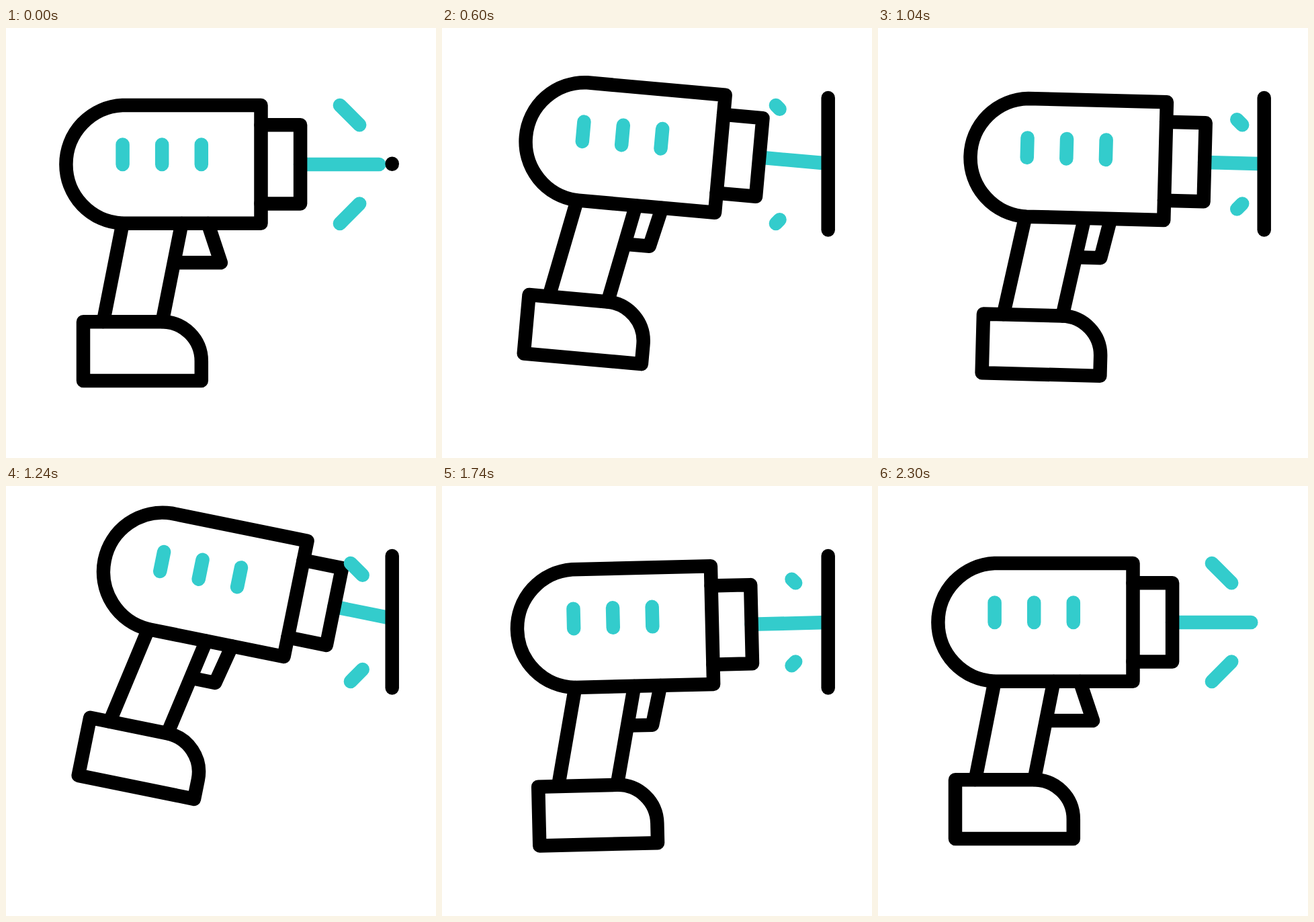
These frames come from a looping animation (640 px wide and 640 px high, 2.4 s). An HTML page:

```html
<!DOCTYPE html>
<html lang="en">
<head>
<meta charset="utf-8">
<title>Drill</title>
<style>
  html, body { margin: 0; width: 100%; height: 100%; overflow: hidden; background: #fff; }
  svg { display: block; width: 100vw; height: 100vh; }
  path { fill: none; stroke: #000; stroke-width: 20.5; stroke-linecap: round; stroke-linejoin: round; }
  .hot { stroke: #33cccc; }
</style>
</head>
<body>
<svg viewBox="0 0 640 640">
  <defs>
    <clipPath id="front"><rect x="-100" y="-100" width="674" height="900"/></clipPath>
  </defs>
  <g clip-path="url(#front)">
    <g id="drill">
      <path class="hot" d="M438 203H555.3"/>
      <path d="M379.5 144.3H438.1V261.5H379.5"/>
      <path id="trigger"/>
      <path d="M173.6 291L144.8 437M261.5 291L232.5 437"/>
      <path d="M379.5 115H173.2A88 88 0 0 0 173.2 290.8H379.5Z"/>
      <path d="M115 437.2H232.2A58.6 58.6 0 0 1 290.8 495.8V525H115Z"/>
      <path class="hot" d="M173.6 173.5V203M232.2 173.5V203M290.8 173.5V203"/>
    </g>
  </g>
  <path id="wall"/>
  <path id="sparks" class="hot"/>
</svg>
<script>
const LOOP = 2400;
const get = id => document.getElementById(id);
const drill = get('drill'), trigger = get('trigger'), wall = get('wall'), sparks = get('sparks');

// Each track is a list of [time, value].
const TILT = [[100, 0], [465, 11.3], [836, -6.85], [1340, 14.7], [1842, -4.3], [2180, 0]];
const PUSH = [[180, 0], [780, 48], [1242, 48], [2180, 0]];
const SQUEEZE = [[0, 0], [200, 1], [1905, 1], [2180, 0]];
const WALL = [[0, 0], [180, 1], [2100, 1], [2300, 0]];

const SPARK_START = 100, SPARK_HALF = 178.5, SPARK_HALVES = 10;

// cubic-bezier(.167, 0, .833, 1)
function soft(u) {
  let lo = 0, hi = 1;
  for (let i = 0; i < 24; i++) {
    const s = (lo + hi) / 2, r = 1 - s;
    const x = 3 * r * r * s * 0.167 + 3 * r * s * s * 0.833 + s * s * s;
    if (x < u) lo = s; else hi = s;
  }
  return lo * lo * (3 - 2 * lo);
}

function sample(track, t, ease = u => u) {
  if (t <= track[0][0]) return track[0][1];
  for (let i = 1; i < track.length; i++) {
    const [t0, a] = track[i - 1], [t1, b] = track[i];
    if (t < t1) return a + (b - a) * ease((t - t0) / (t1 - t0));
  }
  return track[track.length - 1][1];
}

function sparkPath(t) {
  const phase = (t - SPARK_START) / SPARK_HALF;
  const half = Math.floor(phase);
  let from = 0, to = 1;
  if (half >= 0 && half < SPARK_HALVES) {
    if (half % 2) to = phase - half;
    else from = phase - half;
  }
  if (to - from < 0.005) return '';
  const x = 526.2 + (half >= 3 && half < 9 ? 16 : 0);
  const line = (y, dir) => {
    const at = k => `${x - 29.3 * k} ${y + dir * 29.3 * k}`;
    return `M${at(from)}L${at(to)}`;
  };
  return line(144.3, -1) + line(261.6, 1);
}

function draw(t) {
  const tilt = sample(TILT, t, soft);
  const push = sample(PUSH, t);
  drill.setAttribute('transform', `translate(${push} 0) rotate(${tilt} 555.3 203)`);

  const tipX = 320 - 33 * sample(SQUEEZE, t);
  trigger.setAttribute('d', `M300.5 291L${tipX} 349.3H252`);

  const reach = 98.3 * sample(WALL, t);
  wall.setAttribute('d', reach > 0.5 ? `M574.7 ${202.3 - reach}V${202.3 + reach}` : '');

  sparks.setAttribute('d', sparkPath(t));
}

const start = performance.now();
function tick() {
  draw((performance.now() - start) % LOOP);
  requestAnimationFrame(tick);
}
tick();
</script>
</body>
</html>
```
